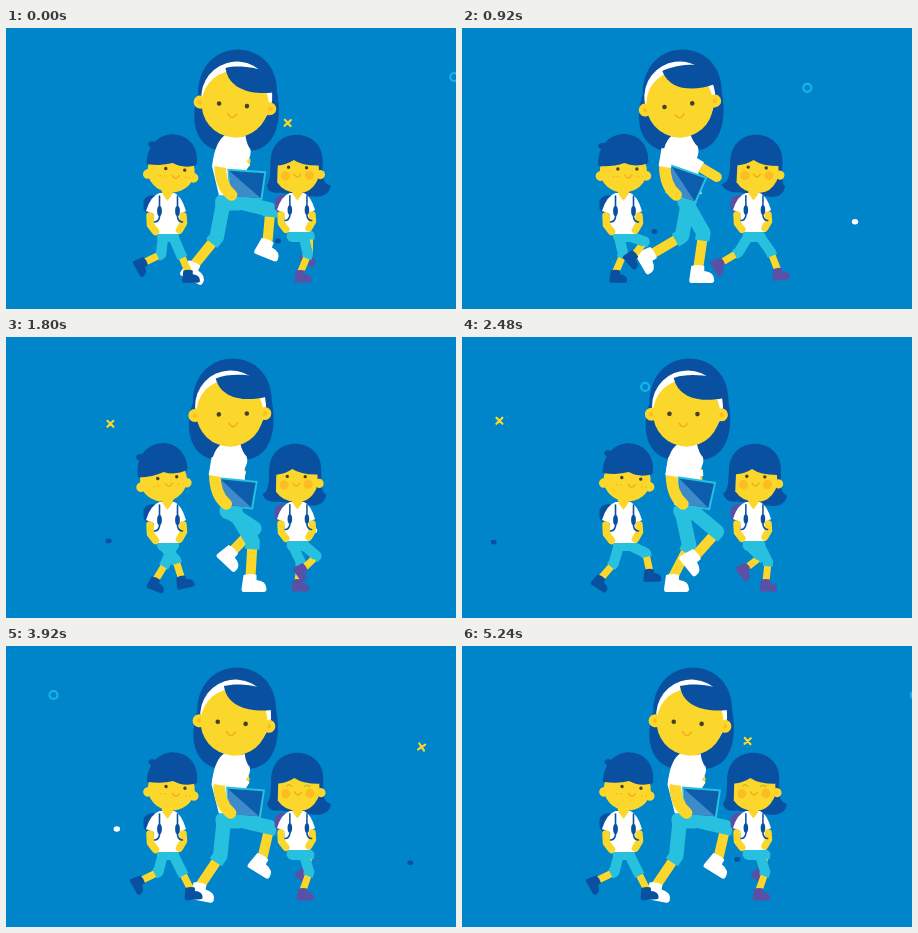
Animation of 450 by 281 pixels, one loop 5.28 s. Source, as an HTML page with a canvas:

```html
<!DOCTYPE html>
<html lang="en">
<head>
<meta charset="utf-8">
<title>Walking to school</title>
<style>
  html, body { margin: 0; width: 100%; height: 100%; overflow: hidden; background: #0085ca; }
  canvas { display: block; width: 450px; height: 281px; }
</style>
</head>
<body>
<canvas id="stage"></canvas>
<script>
const W = 450, H = 281, LOOP = 5280, CYCLE = 1320, STEP = 40, TAU = Math.PI * 2;
const SKY = '#0085ca', NAVY = '#0a50a1', SKIN = '#fbd72b', CYAN = '#27c0df', WHITE = '#fff',
      PURPLE = '#5a50a5', ORANGE = '#f6a91b', BLUSH = '#fbbd22', EYE = '#454028', RING = '#18b3e8';

const canvas = document.getElementById('stage');
const ctx = canvas.getContext('2d');
const dpr = window.devicePixelRatio || 1;
canvas.width = W * dpr;
canvas.height = H * dpr;

const wrap = (n, m) => ((n % m) + m) % m;
const mix = (a, b, u) => a + (b - a) * u;

// One swing per walk cycle, highest at the time `peak`.
const wave = (p, mean, amp, peak) => mean + amp * Math.cos(TAU * (p - peak) / CYCLE);

// Each foot lands at `land`, is carried from `front` to `back` for `hold` ms, then swings forward.
const teacher = {
  bone: 36.5, size: 1, floor: 240, drag: 1.6, shoe: WHITE,
  feet: [{ land: 740, hold: 660, front: 245, back: 175 }, { land: 100, hold: 820, front: 267, back: 190 }]
};
const boy = {
  bone: 19.5, size: .72, floor: 244, drag: 1.2, shoe: NAVY,
  feet: [{ land: 460, hold: 780, front: 176, back: 134 }, { land: 1200, hold: 700, front: 188, back: 142 }]
};
const girl = {
  bone: 19.5, size: .7, floor: 244, drag: 1.2, shoe: PURPLE,
  feet: [{ land: 150, hold: 770, front: 310, back: 260 }, { land: 880, hold: 640, front: 317, back: 282 }]
};

function footAt(p, { land, hold, front, back }, { floor, size, drag }) {
  const age = wrap(p - land, CYCLE);
  if (age < hold) {
    const u = age / hold;
    const strike = Math.max(0, 1 - u / .15), peel = Math.max(0, (u - .78) / .22);
    return { x: mix(front, back, u ** drag), y: floor - size * (5 * strike + 14 * peel ** 2), turn: 60 * peel - 15 * strike };
  }
  const w = (age - hold) / (CYCLE - hold);
  const lift = mix(14, 5, w) + 20 * Math.sin(Math.PI * w ** 2.2);
  return { x: mix(back, front, Math.sin(w * Math.PI / 2) ** 1.5), y: floor - size * lift, turn: 60 - 75 * w ** 3 };
}

function group(x, y, deg, draw, scale = 1) {
  ctx.save();
  ctx.translate(x, y);
  ctx.rotate(deg * Math.PI / 180);
  ctx.scale(scale, scale);
  draw();
  ctx.restore();
}
function shape(d, color) {
  ctx.fillStyle = color;
  ctx.fill(new Path2D(d));
}
function oval(x, y, rx, ry, color) {
  ctx.fillStyle = color;
  ctx.beginPath();
  ctx.ellipse(x, y, rx, ry, 0, 0, TAU);
  ctx.fill();
}
const disc = (x, y, r, color) => oval(x, y, r, r, color);
function line(d, color, width, cap = 'round') {
  ctx.strokeStyle = color;
  ctx.lineWidth = width;
  ctx.lineCap = cap;
  ctx.lineJoin = 'round';
  ctx.stroke(new Path2D(d));
}
const smile = (x, y, r) => line(`M${x - r} ${y} Q${x} ${y + r * 1.7} ${x + r} ${y}`, ORANGE, 1.3);
function eyes(x, y, gap, r, shut) {
  for (const ex of [x - gap, x + gap]) {
    if (shut) line(`M${ex - 2.5} ${y + 1} Q${ex} ${y - 2} ${ex + 2.5} ${y + 1}`, '#c9a52b', 1);
    else disc(ex, y, r, EYE);
  }
}

// The knee sits in front of the line from hip to ankle.
function leg(hx, hy, foot, { bone, size, shoe }) {
  const dx = foot.x - hx, dy = foot.y - hy, d = Math.hypot(dx, dy);
  const bend = .8 * Math.sqrt(Math.max(0, bone ** 2 - d * d / 4)) / d;
  const kx = hx + dx / 2 + dy * bend, ky = hy + dy / 2 - dx * bend;
  line(`M${kx} ${ky} L${foot.x} ${foot.y}`, SKIN, 10 * size);
  group(foot.x, foot.y, foot.turn, () =>
    shape('M-7 -2 Q0 -4 6 -2 L6 3 Q16 4 16 12 Q16 15 13 15 L-7 15 Q-9 15 -9 12 Z', shoe), size);
  line(`M${hx} ${hy} L${kx} ${ky} L${mix(kx, foot.x, .22)} ${mix(ky, foot.y, .22)}`, CYAN, 14.5 * size, 'butt');
}
function legs(p, who, x, y, spread) {
  leg(x - spread, y, footAt(p, who.feet[0], who), who);
  leg(x + spread, y, footAt(p, who.feet[1], who), who);
  line(`M${x - spread} ${y} L${x + spread} ${y}`, CYAN, 17 * who.size);
}

function drawTeacher(p, shut) {
  const hx = wave(p, 223.8, 7, 150), bx = hx + .5;
  const turn = wave(p, -1, 8, 130), look = wave(p, 0, 3, 480);
  const reach = (wave(p, 1, 1, 860) / 2) ** 2;

  group(hx + 1, 76, 0, () =>
    shape('M-38 -10 C-38 -69 41 -69 41 -12 C47 20 38 45 14 47 L-14 47 C-38 45 -48 20 -38 -10 Z', NAVY));
  legs(p, teacher, 225, 174, wave(p, 4, 4, 100));

  const mx = bx + 10, my = 133, rx = 226 + 30 * reach, ry = 149;
  line(`M${mx} ${my} L${rx} ${ry}`, SKIN, 10);
  line(`M${mx} ${my} L${mix(mx, rx, .4)} ${mix(my, ry, .4)}`, WHITE, 12, 'butt');
  line(`M${hx} 98 L${bx} 110`, SKIN, 14);
  group(bx, 106, turn * .8, () =>
    shape('M-9 1 Q0 6 10 1 Q12 10 16 14 Q18 20 13 27 L14 40 L15 62 L-12 62 L-21 34 Q-20 8 -9 1 Z', WHITE));

  group(bx + 8 + turn * .5, 157, 3 + 17 * reach, () => {
    shape('M-20 -15 L19 -15 L17 14 L-16 14 Z', CYAN);
    shape('M-18 -13 L17 -13 L15 12 L-14 12 Z', '#0c5dac');
    shape('M-18 -13 L15 12 L-14 12 Z', '#3d8bc8');
  });
  const sx = bx - 15.5;
  line(`M${sx} 137 Q${sx} 158 ${bx - 4} 167`, SKIN, 11.5);
  line(`M${sx + 3} 121 L${sx} 139`, WHITE, 12.5, 'butt');

  group(hx, 76, turn, () => {
    disc(1, -7, 35.5, WHITE);
    for (const x of [-35, 35]) {
      disc(x, 1.5, 6.5, SKIN);
      disc(x, 1.5, 2.3, BLUSH);
    }
    disc(0, 0, 33.5, SKIN);
    shape('M-13 -35 C3 -41 32 -37 37 -31 Q40 -22 36 -15 C18 -11 -8 -13 -13 -35 Z', NAVY);
    eyes(look, 1, 14, 2.3, shut);
    smile(look, 10, 4.5);
  });
}

function kidTorso(x, size, pack) {
  group(x, 164, 0, () => {
    shape('M-12 3 Q-23 3 -23 11 L-23 17 Q-22 22 -12 22 Z', pack);
    shape('M-7 1 L8 1 Q15 4 19.5 19 L14 22 L14 42 L-12 42 L-13 22 L-20.5 19 Q-16 4 -7 1 Z', WHITE);
    line('M-16.5 24 L-16 33 L-11 39.5', SKIN, 7.5);
    line('M16.5 24 L17 31 L13 38', SKIN, 7.5);
    shape('M-5 -2 L7 -2 L6 2 L1 9 L-4 2 Z', SKIN);
    for (const [s, side] of [[-7, -1], [11, 1]]) {
      line(`M${s} 4 L${s} 25 Q${s + side} 30 ${s + side * 5} 30`, NAVY, 1.6);
      oval(s, 19, 2.4, 5, NAVY);
    }
  }, size);
}

function drawBoy(p) {
  const x = 160.5, look = 4;
  legs(p, boy, x + 1.5, 208, 5);
  kidTorso(x, 1, NAVY);
  group(wave(p, 161.2, 4.2, 1240), 143, wave(p, -.5, 5.7, 1240), () => {
    disc(-23, 5, 4.8, SKIN);
    disc(23, 5, 4.8, SKIN);
    oval(0, 0, 23.5, 21.5, SKIN);
    oval(-21, -25, 4, 3, NAVY);
    shape('M-25 -5 C-27 -47 27 -47 25 -8 Q12 -3 1 -8 Q-10 -4 -25 -5 Z', NAVY);
    eyes(look, -2, 9.5, 1.7);
    smile(look + 1, 4, 3.5);
    for (const s of [-14, -10, 11, 15]) disc(look + s, 5.5, .7, ORANGE);
  });
}

function drawGirl(p, shut) {
  const x = 290.5, look = 1, hx = wave(p, 291, 3, 950), turn = wave(p, 1.5, 1, 950);
  const sway = wave(p, 0, 3, 100);
  group(hx, 145, turn, () =>
    shape(`M-26 -12 C-26 -47 26 -47 26 -12 C26 5 27 10 ${32 + sway} 12 Q${30 + sway} 25 14 23
           L-16 20 Q-28 22 ${sway - 32} 13 C-27 10 -26 5 -26 -12 Z`, NAVY));
  legs(p, girl, x + 1.5, 208, 5.5);
  kidTorso(x, .95, PURPLE);
  group(hx, 145, turn, () => {
    disc(24, 1, 4.6, SKIN);
    shape('M-19 -14 L21 -14 Q24 0 21 7 Q15 20 2 20 Q-12 20 -19 10 Z', SKIN);
    shape('M-26 -8 C-26 -47 25 -47 24 -8 Q6 -7 -3 -13 Q-10 -8 -19 -7 L-20 4 L-26 4 Z', NAVY);
    disc(look - 12, 3, 4.6, BLUSH);
    disc(look + 12, 2, 4.6, BLUSH);
    eyes(look, -5.5, 9, 1.7, shut);
    smile(look, 1, 3.5);
  });
}

// Floating bits drift left from the right edge; `slow` eases their speed.
function float(t, born, x, y, speed, slow, climb, draw) {
  const age = wrap(t - born, LOOP);
  group(x - speed * age + slow * age * age, y - climb * age, 0, () => draw(age));
}
function drawBits(t) {
  const bob = t < 2700 ? 14 * Math.sin(Math.PI * t / 2700) ** 2 : 0;
  float(t, 3480, 459, 103, .0985, 0, .0045, age =>
    group(0, 0, Math.max(0, 14 - age * .006), () => line('M-3 -3 L3 3 M3 -3 L-3 3', SKIN, 2.2)));
  float(t, 5170, 461, 49 + bob, .1157, 3.25e-6, 0, () => {
    ctx.strokeStyle = RING;
    ctx.lineWidth = 2.2;
    ctx.beginPath();
    ctx.arc(0, 0, 4, 0, TAU);
    ctx.stroke();
  });
  float(t, 280, 456, 183 + bob, .0992, 1.2e-6, 0, () => oval(0, 0, 3.2, 2.7, WHITE));
  float(t, 3400, 454, 219, .0955, 0, .0041, age => {
    const sway = Math.sin(TAU * (age - 520) / 3160);
    oval(-6 * sway, 4 * sway, 3, 2.4, NAVY);
  });
}

function render(t) {
  const p = t % CYCLE;
  ctx.setTransform(dpr, 0, 0, dpr, 0, 0);
  ctx.fillStyle = SKY;
  ctx.fillRect(0, 0, W, H);
  drawBits(t);
  drawTeacher(p, t >= 3040 && t < 3200);
  drawBoy(p);
  drawGirl(p, p >= 1200);
}

const start = performance.now();
function tick() {
  const t = (performance.now() - start) % LOOP;
  render(Math.floor(t / STEP) * STEP);
  requestAnimationFrame(tick);
}
tick();
</script>
</body>
</html>
```
